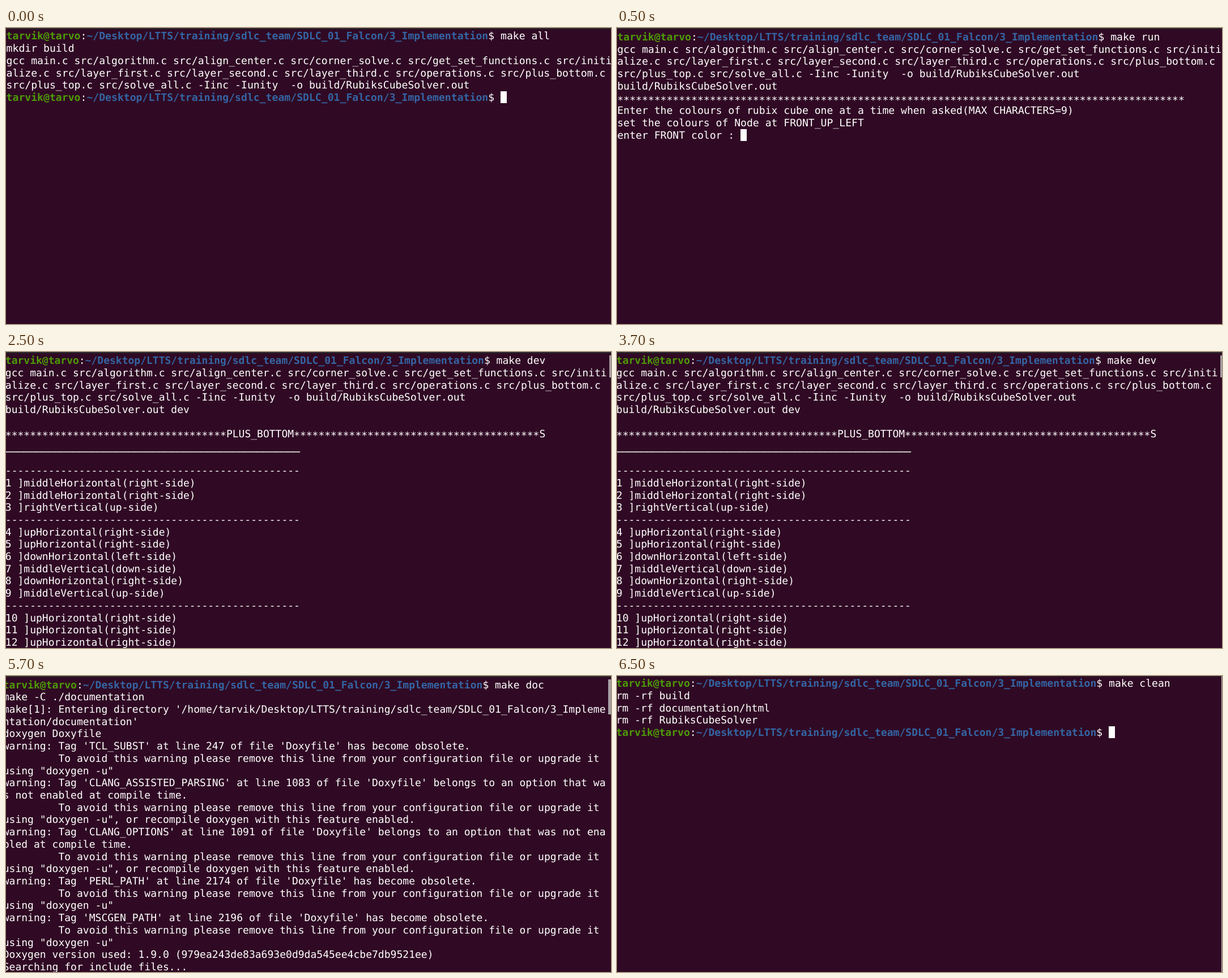
An HTML page that plays this animation: 1068x524 px, repeating every 8 s.

```html
<!DOCTYPE html>
<html lang="en">
<head>
<meta charset="utf-8">
<title>Terminal session</title>
<style>
  html, body { margin: 0; width: 100%; height: 100%; overflow: hidden; background: #300a24; }
  #stage { position: relative; width: 1068px; height: 524px; overflow: hidden; }
  .screen { position: absolute; inset: 0; overflow: hidden; background: #300a24; visibility: hidden; }
  .rows {
    position: absolute; margin: 0; white-space: pre; color: #fff;
    font-family: "DejaVu Sans Mono", "Noto Sans Mono", monospace;
    text-rendering: geometricPrecision; font-variant-ligatures: none;
  }
  .user { color: #4e9a06; font-weight: bold; }
  .path { color: #3465a4; font-weight: bold; }
  .stars { position: relative; top: 3px; }
  .line { -webkit-text-stroke: 0.7px #fff; }
  .box { position: absolute; }
</style>
</head>
<body>
<div id="stage"></div>
<script>
const ADVANCE = 0.60205; // glyph advance of the mono face, in em
const DROP = 1;          // text sits this far below the cell grid
const LOOP = 8000;
const stage = document.getElementById('stage');

const user = 'tarvik';
const dir = 'Desktop/LTTS/training/sdlc_team/SDLC_01_Falcon/3_Implementation';
const prompt = cmd =>
  `<span class="user">${user}@tarvo</span>:<span class="path">~/${dir}</span>$ ${cmd}`;

const out = 'build/RubiksCubeSolver.out';
const compile = [
  'gcc main.c src/algorithm.c src/align_center.c src/corner_solve.c src/get_set_functions.c src/initi',
  'alize.c src/layer_first.c src/layer_second.c src/layer_third.c src/operations.c src/plus_bottom.c ',
  'src/plus_top.c src/solve_all.c -Iinc -Iunity  -o ' + out
];

const stars = n => `<span class="stars">${'*'.repeat(n)}</span>`;
const rule = '-'.repeat(48);
let step = 0;
const move = (part, side) => `${++step} ]${part}(${side}-side)`;

const avoid = ' '.repeat(9) +
  'To avoid this warning please remove this line from your configuration file or upgrade it ';
const tag = (name, line) => `warning: Tag '${name}' at line ${line} of file 'Doxyfile' `;
const obsolete = (name, line) =>
  [tag(name, line) + 'has become obsolete.', avoid, 'using "doxygen -u"'];
const disabled = (name, line, head, tail) => [
  tag(name, line) + 'belongs to an option that ' + head, tail, avoid,
  'using "doxygen -u", or recompile doxygen with this feature enabled.'
];

// cell: column width, pitch: row height, x/y: grid origin, cursor: [column, row]
// boxes: [x, y, width, height, colour]
const strip = [0, 0, 1068, 2, '#2c2a2b'];
const screens = [
  { at: 0, cell: 10.905, pitch: 21.75, x: 0.6, y: 3.4, cursor: [80, 5], boxes: [strip],
    lines: [prompt('make all'), 'mkdir build', ...compile, prompt('')] },

  { at: 500, cell: 10.885, pitch: 21.75, x: 0.4, y: 4.8, cursor: [20, 8], boxes: [strip],
    lines: [
      prompt('make run'), ...compile, out, stars(92),
      'Enter the colours of rubix cube one at a time when asked(MAX CHARACTERS=9)',
      'set the colours of Node at FRONT_UP_LEFT',
      'enter FRONT color : '
    ] },

  { at: 2500, cell: 10.835, pitch: 21.68, x: -1.2, y: 4.4,
    boxes: [strip, [1065, 6, 3, 39, '#a8a0a6']],
    lines: [
      prompt('make dev'), ...compile, out + ' dev', '',
      stars(36) + 'PLUS_BOTTOM' + stars(40) + 'S',
      `<span class="line">${'_'.repeat(48)}</span>`, '', rule,
      move('middleHorizontal', 'right'), move('middleHorizontal', 'right'),
      move('rightVertical', 'up'), rule,
      move('upHorizontal', 'right'), move('upHorizontal', 'right'),
      move('downHorizontal', 'left'), move('middleVertical', 'down'),
      move('downHorizontal', 'right'), move('middleVertical', 'up'), rule,
      move('upHorizontal', 'right'), move('upHorizontal', 'right'),
      move('upHorizontal', 'right')
    ] },

  { at: 4500, cell: 10.855, pitch: 21.72, x: -5.3, y: 4.5,
    boxes: [strip, [1063, 6, 5, 62, '#a8a0a6']],
    lines: [
      prompt('make doc'), 'make -C ./documentation',
      `make[1]: Entering directory '/home/${user}/${dir.slice(0, -7)}`,
      "ntation/documentation'", 'doxygen Doxyfile',
      ...obsolete('TCL_SUBST', 247),
      ...disabled('CLANG_ASSISTED_PARSING', 1083, 'wa', 's not enabled at compile time.'),
      ...disabled('CLANG_OPTIONS', 1091, 'was not ena', 'bled at compile time.'),
      ...obsolete('PERL_PATH', 2174),
      ...obsolete('MSCGEN_PATH', 2196),
      'Doxygen version used: 1.9.0 (979ea243de83a693e0d9da545ee4cbe7db9521ee)',
      'Searching for include files...'
    ] },

  { at: 6500, cell: 10.87, pitch: 21.7, x: -1.6, y: 2.4, cursor: [80, 4],
    boxes: [[0, 0, 1068, 1, '#2c2a2b'], [1067, 0, 1, 524, '#c9c0c6']],
    lines: [
      prompt('make clean'), 'rm -rf build', 'rm -rf documentation/html',
      'rm -rf RubiksCubeSolver', prompt('')
    ] }
];

function add(parent, cls, style) {
  const el = document.createElement('div');
  el.className = cls;
  Object.assign(el.style, style);
  parent.append(el);
  return el;
}

function addBox(parent, [x, y, w, h, background]) {
  add(parent, 'box', {
    left: x + 'px', top: y + 'px', width: w + 'px', height: h + 'px', background
  });
}

// Difference between the grid column and the rendered glyph advance
function gridGap(style, cell) {
  const probe = add(stage, 'rows', style);
  probe.textContent = 'x'.repeat(100);
  const gap = cell - probe.getBoundingClientRect().width / 100;
  probe.remove();
  return gap;
}

for (const s of screens) {
  s.el = add(stage, 'screen', {});
  const font = { fontSize: s.cell / ADVANCE + 'px', lineHeight: s.pitch + 'px' };
  const rows = add(s.el, 'rows', {
    ...font, left: s.x + 'px', top: s.y + DROP + 'px',
    letterSpacing: gridGap(font, s.cell).toFixed(4) + 'px'
  });
  for (const line of s.lines) {
    add(rows, '', { height: s.pitch + 'px' }).innerHTML = line;
  }
  if (s.cursor) {
    const [col, row] = s.cursor;
    addBox(s.el, [s.x + col * s.cell, s.y + row * s.pitch, s.cell, s.pitch - 0.5, '#fff']);
  }
  s.boxes.forEach(b => addBox(s.el, b));
}

const start = performance.now();
function draw() {
  const t = (performance.now() - start) % LOOP;
  const now = screens.findLast(s => t >= s.at);
  for (const s of screens) s.el.style.visibility = s === now ? 'visible' : 'hidden';
  requestAnimationFrame(draw);
}
draw();
</script>
</body>
</html>
```
